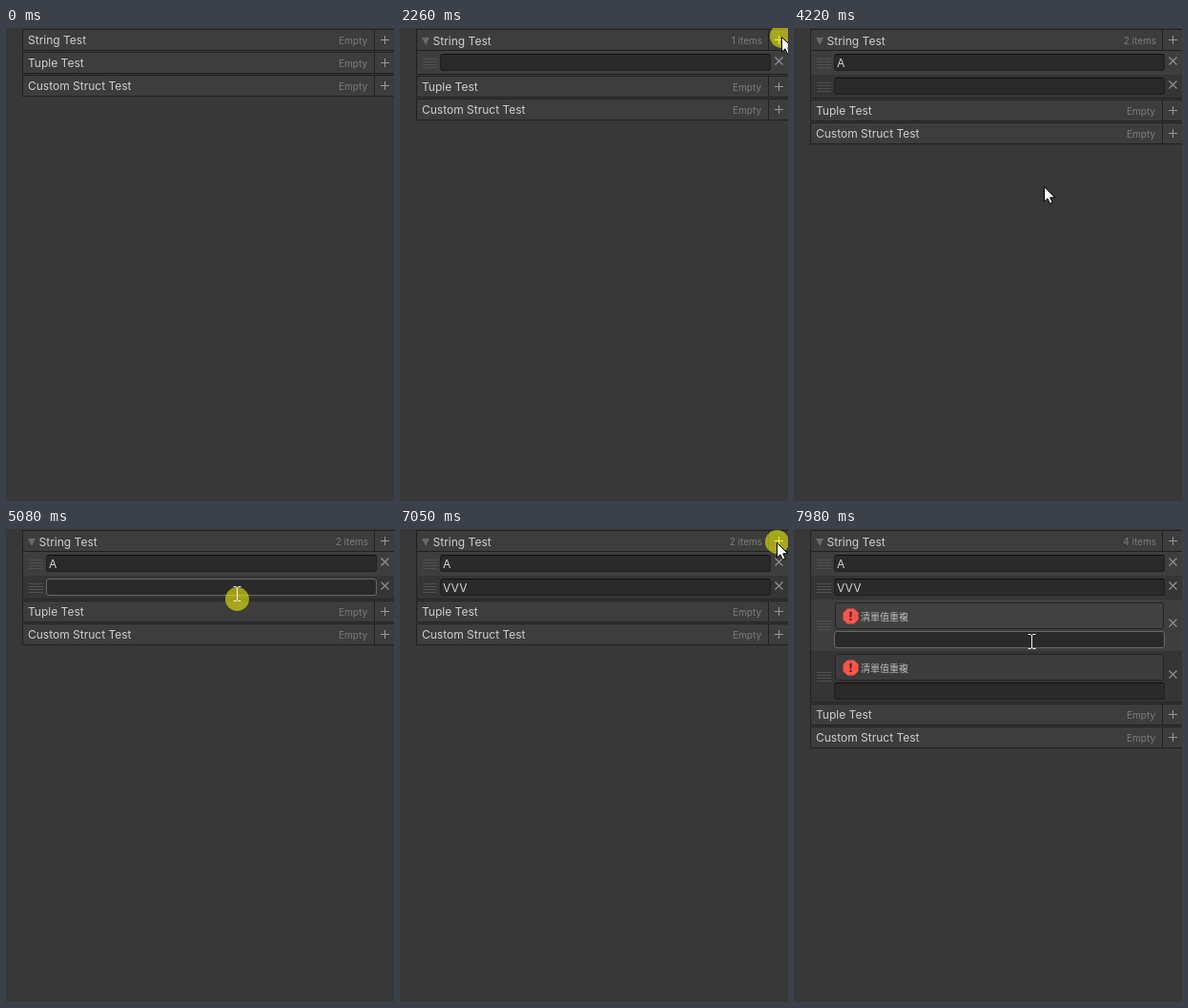
An HTML page for the animation above (8 s loop, 407 by 496 pixels).

```html
<!DOCTYPE html>
<html lang="en">
<head>
<meta charset="utf-8">
<title>Set list inspector</title>
<style>
  * { box-sizing: border-box; }
  html, body { margin: 0; width: 100%; height: 100%; overflow: hidden; background: #383838; }
  body { position: relative; color: #cfcfcf; font: 12px/16px Inter, sans-serif; cursor: none; }
  #stage { position: absolute; left: 0; top: 0; width: 407px; height: 496px; padding-top: 1px; overflow: hidden; }

  .list { position: relative; margin: 0 0 1px 17px; width: 400px; border: 1px solid #212121; border-right: 0; background: #383838; }
  .head { position: relative; height: 21px; background: #3d3d3d; }
  .list.open .head { height: 22px; border-bottom: 1px solid #212121; }
  .head b { position: absolute; left: 5px; top: 3px; font-weight: 400; white-space: nowrap; }
  .open .head b { left: 16.6px; top: 4px; }
  .head i { position: absolute; right: 38px; top: 3px; color: #7c7c7c; font: 10px/16px Inter, sans-serif; }
  .open .head i { right: 37px; }
  .tri { display: none; position: absolute; left: 4.5px; top: 8px; border: solid transparent; border-width: 8px 4.5px 0; border-top-color: #696969; }
  .open .tri { display: block; }
  .add { position: absolute; left: 368px; top: 0; width: 31px; height: 21px; border-left: 1px solid #212121; color: #999; }
  .add.hot { color: #d6d6d6; }
  .add::before, .add::after { content: ""; position: absolute; background: currentColor; }
  .add::before { left: 6px; top: 10px; width: 9px; height: 1px; }
  .add::after { left: 10px; top: 6px; width: 1px; height: 9px; }

  /* the list's bottom border overlaps the last row */
  .open .rows { margin-bottom: -1px; }
  .open::after { content: ""; position: absolute; left: 0; right: 0; bottom: -1px; height: 1px; background: #212121; }
  .row { position: relative; height: 25px; background: #3e3e3e; }
  .row:nth-child(even) { background: #353535; }
  .row.dup { height: 54px; }
  .grip { position: absolute; left: 6px; top: 8px; width: 15px; height: 10px;
    background: repeating-linear-gradient(#505050 0 1px, transparent 1px 3px); }
  .dup .grip { top: 22px; }
  .field { position: absolute; left: 24px; top: 3px; width: 347px; height: 18px; padding-left: 2px;
    border: 1px solid #1f1f1f; border-top-color: #111; border-radius: 3px; background: #2a2a2a; color: #d2d2d2;
    line-height: 17px; letter-spacing: .15px; }
  .dup .field { top: 33px; }
  .field.hover { border-color: #676767; }
  .field.focus { border-color: #3a79bb; }
  .caret { display: none; position: absolute; top: 1px; width: 1px; height: 14px; background: #d8d8d8; }
  .focus .caret { display: inline-block; }
  .note { display: none; position: absolute; left: 25px; top: 3px; width: 345px; height: 28px; padding-left: 26px;
    border: 1px solid #242424; border-radius: 3px; background: #414141; color: #bdbdbd;
    font: 10px/27px "Noto Sans CJK TC", "Noto Sans CJK", "Noto Sans CJK JP", sans-serif; }
  .row:nth-child(even) .note { background: #3c3c3c; }
  .dup .note { display: block; }
  .note svg { position: absolute; left: 7px; top: 5px; }
  .cross { position: absolute; left: 375px; top: 6px; }
  .dup .cross { top: 20px; }

  #ring { position: absolute; width: 25px; height: 25px; margin: -13px 0 0 -12px; border-radius: 50%; background: rgba(255, 255, 0, .55); }
  .pointer { position: absolute; left: 0; top: 0; overflow: visible; }
</style>
</head>
<body>
<div id="stage"></div>
<script>
const LOOP = 8000, TICK = 78.3;

// Pointer positions: tick, x, y
const PATH = [
  [4, 283, 478], [6, 300, 380], [9, 340, 190], [11, 366, 82], [14, 385, 27], [16, 385, 27],
  [19, 400, 7], [24, 400, 7], [25, 400, 8], [31, 400, 9], [37, 297, 65], [49, 297, 65],
  [54, 262, 166], [58, 245, 77], [59, 245, 77], [62, 242, 68], [69, 242, 68], [75, 208, 173],
  [78, 208, 173], [81, 216, 214], [83, 216, 214], [88, 396, 8], [89, 395, 14], [95, 395, 14],
  [102, 249, 118]
];
const PRESSED = [20, 21, 29, 30, 40, 65, 82, 90, 94];
const ADDED = [22, 31, 91, 95];
const TYPED = [[[44, "A"]], [[68, "V"], [72, "V"], [77, "V"]], [], []];

const stage = document.getElementById("stage");
const make = (parent, cls, html = "") => {
  const el = document.createElement("div");
  el.className = cls;
  el.innerHTML = html;
  return parent.appendChild(el);
};

const lists = ["String Test", "Tuple Test", "Custom Struct Test"].map(name => {
  const el = make(stage, "list");
  make(el, "head", `<span class="tri"></span><b>${name}</b><i>Empty</i><span class="add"></span>`);
  return el;
});
const main = lists[0];
const count = main.querySelector("i");
const plus = main.querySelector(".add");
const body = make(main, "rows");

const rows = TYPED.map(() => {
  const el = make(body, "row", `
    <div class="grip"></div>
    <div class="note"><svg width="17" height="17" viewBox="-8.5 -8.5 17 17">
      <path d="M-3.4-8H3.4L8-3.4V3.4L3.4 8H-3.4L-8 3.4V-3.4Z" fill="#ff534a"/>
      <path d="M-1.2-4.7H1.2L.8 1.3H-.8ZM-1.1 2.5H1.1V4.6H-1.1Z" fill="#3a2927"/></svg>清單值重複</div>
    <div class="field"><span></span><span class="caret"></span></div>
    <svg class="cross" width="9" height="9"><path d="M.5.5l8 8M8.5.5l-8 8" stroke="#929292" stroke-width="1.1"/></svg>`);
  return { el, field: el.querySelector(".field"), text: el.querySelector("span") };
});

const ring = make(stage, "");
ring.id = "ring";
const pointers = make(stage, "", `
  <svg class="pointer" width="13" height="19"><path d="M.5.5V16L4 12.8 6.5 18.3 9.2 17.1 6.8 11.8H11.8Z" fill="#fff" stroke="#000"/></svg>
  <svg class="pointer" width="8" height="16"><path d="M-3.5-7.5H-1L.5-6.5 2-7.5H4.5M.5-6.5V6.5M-3.5 7.5H-1L.5 6.5 2 7.5H4.5" fill="none" stroke="#f0f0f0"/></svg>`);
const [arrow, beam] = pointers.children;

const show = (el, on) => { el.style.display = on ? "" : "none"; };
const place = (el, x, y) => { el.style.transform = `translate(${x}px, ${y}px)`; };

function pointerAt(tick) {
  const i = PATH.findIndex(p => p[0] >= tick);
  if (i < 1) return PATH[i < 0 ? PATH.length - 1 : 0].slice(1);
  const [a, b] = [PATH[i - 1], PATH[i]];
  const k = (tick - a[0]) / (b[0] - a[0]);
  return [1, 2].map(n => Math.round(a[n] + (b[n] - a[n]) * k));
}

function focusAt(tick) {
  if (tick >= 41 && tick < 44) return 0;
  return tick >= 66 && tick < 83 ? 1 : -1;
}

function draw(tick) {
  const n = ADDED.filter(t => t <= tick).length;
  const texts = TYPED.slice(0, n).map(keys => keys.filter(k => k[0] <= tick).map(k => k[1]).join(""));
  const clash = texts.filter(s => !s).length > 1;
  const [x, y] = pointerAt(tick);
  const visible = tick >= PATH[0][0];
  const focus = focusAt(tick);
  let over = false, top = 24;

  main.classList.toggle("open", n > 0);
  count.textContent = n ? `${n} items` : "Empty";
  plus.classList.toggle("hot", visible && x > 386 && y < 24);

  rows.forEach(({ el, field, text }, i) => {
    show(el, i < n);
    if (i >= n) return;
    const dup = clash && !texts[i];
    const edge = top + (dup ? 33 : 3);
    const hover = visible && x >= 42 && x < 389 && y >= edge && y < edge + 18;
    over = over || hover;
    el.classList.toggle("dup", dup);
    field.classList.toggle("hover", hover);
    field.classList.toggle("focus", i === focus);
    text.textContent = texts[i];
    top += dup ? 54 : 25;
  });

  show(arrow, visible && !over);
  show(beam, visible && over);
  place(arrow, x, y);
  place(beam, x, y);
  show(ring, PRESSED.includes(tick));
  ring.style.left = x + "px";
  ring.style.top = y + (over ? 6 : 0) + "px";
}

const start = performance.now();
let last = -1;
function run(now) {
  const tick = Math.floor((Math.max(0, now - start) % LOOP) / TICK + 0.2);
  if (tick !== last) draw(last = tick);
  requestAnimationFrame(run);
}
draw(0);
requestAnimationFrame(run);
</script>
</body>
</html>
```
